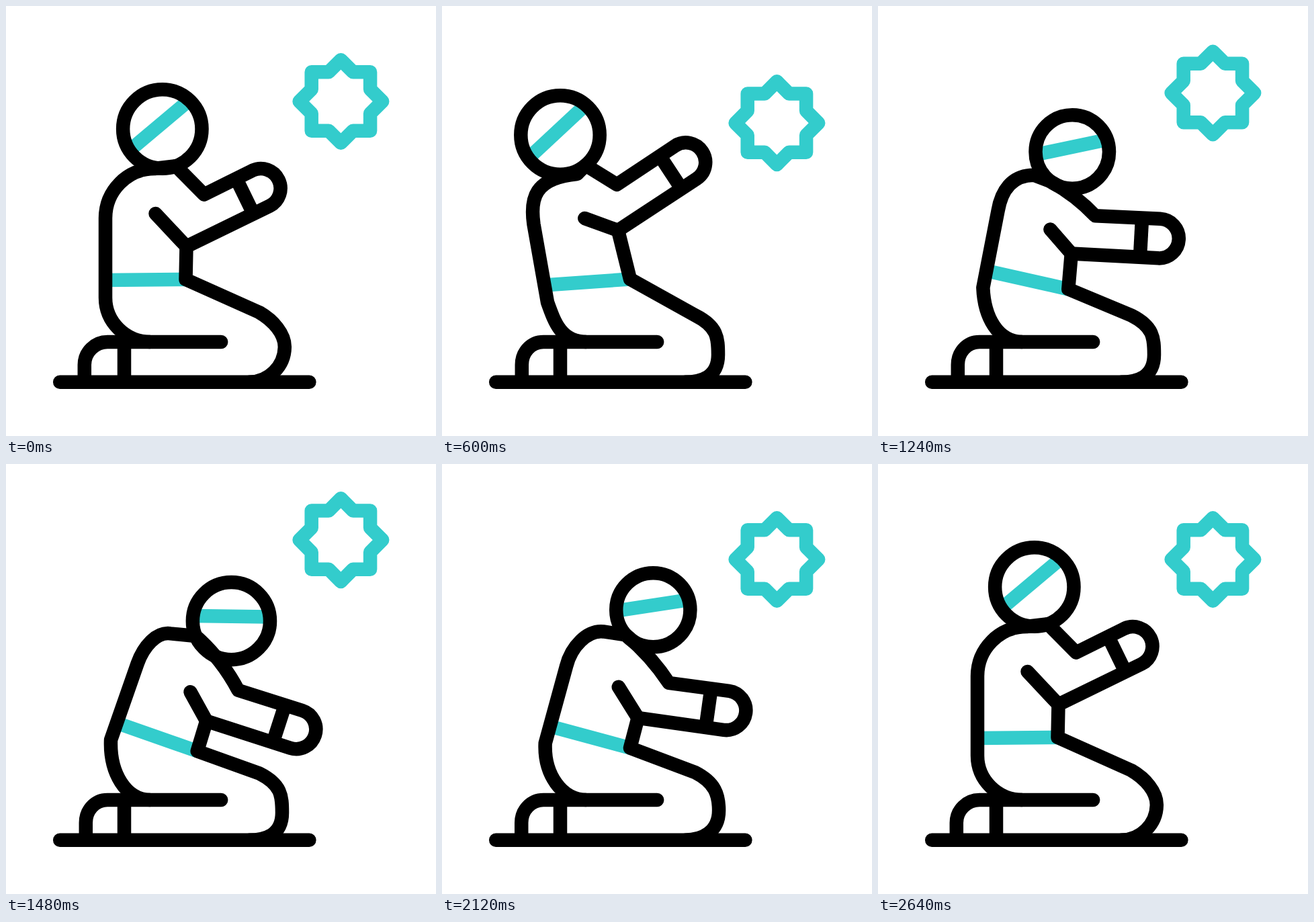
An HTML page that plays this animation: 640 by 640 pixels, repeating every 3 s.

```html
<!DOCTYPE html>
<html lang="en">
<head>
<meta charset="utf-8">
<title>Kneeling figure</title>
<style>
  html, body { margin: 0; width: 100%; height: 100%; overflow: hidden; background: #fff; }
  svg { display: block; width: 100%; height: 100%; }
  path, circle { fill: none; stroke: #000; stroke-width: 20.5; stroke-linejoin: round; }
  .teal { stroke: #33cccc; }
  .round { stroke-linecap: round; }
</style>
</head>
<body>
<svg viewBox="0 0 640 640">
  <path id="star" class="teal"/>
  <path id="belt" class="teal"/>
  <path id="stripe" class="teal"/>
  <circle id="head"/>
  <path id="cuff"/>
  <path id="torso" class="round"/>
  <path id="arm" class="round"/>
  <path id="leg" class="round"/>
  <path id="foot"/>
  <path class="round" d="M80.2 559.7H451.4"/>
</svg>
<script>
const LOOP = 3000;
const BACK = 600, FRONT = 1660, LEAVE = 1840, REST = 2620;
const HEAD_R = 58.7, HAND_R = 29.3;

// Three key poses. Angles in degrees; hipPull and the shoulder pulls are curve handles.
const rest = {
  head: [232.8, 183], tilt: -40, neck: 70, bend: 0,
  hip: [148, 434], hipPull: [148, 470],
  back: [148, 316], pullA: [148, 275], pullB: [181, 242], shoulder: [221, 242],
  upper: [222.5, 309], elbow: [268.5, 358], waist: [267.5, 407],
  arm: -26, reach: 138, crease: 57.6
};
const lean = {
  head: [176, 192], tilt: -43, neck: 50, bend: 0,
  hip: [157, 441], hipPull: [168, 472],
  back: [136.5, 325], pullA: [131, 287], pullB: [137, 256], shoulder: [201, 250],
  upper: [212.3, 316], elbow: [262, 334], waist: [280, 406.5],
  arm: -33.3, reach: 140, crease: 36
};
const bow = {
  head: [347.2, 238.5], tilt: 4, neck: 165, bend: 10,
  hip: [156, 408], hipPull: [153, 458],
  back: [200, 295], pullA: [210, 271], pullB: [230, 249], shoulder: [248, 252.5],
  upper: [279, 341], elbow: [301, 386], waist: [285, 429],
  arm: 21.7, reach: 132, crease: 30.5
};

const set = (id, attrs) => {
  for (const k in attrs) document.getElementById(id).setAttribute(k, attrs[k]);
};
const ease = (t, from, to) => {
  const p = Math.min(1, Math.max(0, (t - from) / (to - from)));
  return (1 - Math.cos(Math.PI * p)) / 2;
};
const mix = (a, b, p) =>
  Array.isArray(a) ? a.map((v, i) => mix(v, b[i], p)) : a + (b - a) * p;

function blend(a, b, p) {
  const out = {};
  for (const k in a) out[k] = mix(a[k], b[k], p);
  return out;
}

// Wide swings pull the head along an arc and draw head and arm in a little.
function poseAt(t) {
  if (t < BACK) return { ...blend(rest, lean, ease(t, 0, BACK)), size: HEAD_R };
  const rising = t > LEAVE;
  const p = rising ? ease(t, LEAVE, REST) : ease(t, BACK, FRONT);
  const pose = rising ? blend(bow, rest, p) : blend(lean, bow, p);
  const swing = 4 * p * (1 - p);
  pose.head[1] -= 6.5 * swing;
  pose.reach *= 1 - 0.045 * swing;
  pose.size = HEAD_R * (1 - 0.075 * swing);
  return pose;
}

// Point at (x, y) in a frame turned by deg around o.
function local(o, deg, x, y) {
  const a = deg * Math.PI / 180, c = Math.cos(a), s = Math.sin(a);
  return [o[0] + x * c - y * s, o[1] + x * s + y * c];
}

const at = p => p[0].toFixed(2) + " " + p[1].toFixed(2);
const path = (...pts) => "M" + pts.map(at).join("L");
const line = p => "L" + at(p);
const curve = (...pts) => (pts.length > 2 ? "C" : "Q") + pts.map(at).join(" ");

function drawStar(t) {
  const down = 37.6, up = -29;
  const shift = t < 800 ? mix(0, down, ease(t, 0, 800))
    : t < 1460 ? mix(down, up, ease(t, 800, 1460))
    : mix(up, 0, ease(t, 1460, 2040));
  const center = [498.4, 142 + shift];
  const pts = [];
  for (let i = 0; i < 16; i++) pts.push(local(center, i * 22.5, 0, i % 2 ? -47.3 : -61.8));
  set("star", { d: path(...pts) + "Z" });
}

function drawHead({ head, size, tilt }) {
  set("head", { cx: head[0], cy: head[1], r: size });
  set("stripe", { d: path(local(head, tilt, 2 - size, -7), local(head, tilt, size - 2, -7)) });
}

function drawBody(p) {
  const seat = [215, 500];
  const neck = local(p.head, p.neck, p.size, 0);
  const arm = (x, y) => local(p.elbow, p.arm, x, y);
  const width = 2 * HAND_R;
  const crease = arm(p.crease, -58);
  const slope = Math.atan2(crease[1] - neck[1], crease[0] - neck[0]) * 180 / Math.PI;
  const bend = local(mix(neck, crease, 0.5), slope, 0, -p.bend);

  set("torso", {
    d: path([320.2, 500], seat) + curve([178, 500], p.hipPull, p.hip) +
      line(p.back) + curve(p.pullA, p.pullB, p.shoulder) +
      line(neck) + curve(bend, crease) + line(arm(p.reach, -width)) +
      `A${HAND_R} ${HAND_R} 0 0 1 ` + at(arm(p.reach, 0)) + line(p.elbow)
  });
  set("arm", { d: path(p.upper, p.elbow) });
  set("cuff", { d: path(arm(p.reach - 27, -width + 4), arm(p.reach - 27, -4)) });
  set("belt", { d: path(mix(p.hip, p.back, 0.22), p.waist) });
}

// Knee and foot shift once the figure leaves its rest pose.
function drawLegs(p, k) {
  const thigh = [377, mix(456, 460.5, k)];
  const kx = mix(414.8, 411, k);
  const knee = [kx, mix(507, 519, k)];
  set("leg", {
    d: path(p.elbow, p.waist, thigh) +
      curve(mix([398, 468], [410, 477], k), [kx, mix(488, 494, k)], knee) +
      curve([kx, mix(536, 553, k)], [mix(391, 385, k), 559.7], [362, 559.7])
  });
  const fx = mix(116.8, 118.8, k);
  set("foot", {
    d: path([fx, 560], [fx, 534]) + curve([fx, 515.3], [132.3, 500], [151, 500]) +
      "H215M176 500V560"
  });
}

function draw(t) {
  const pose = poseAt(t);
  drawStar(t);
  drawHead(pose);
  drawBody(pose);
  drawLegs(pose, ease(t, 0, BACK) - ease(t, LEAVE, REST));
}

const start = performance.now();
function tick(now) {
  draw(Math.max(0, now - start) % LOOP);
  requestAnimationFrame(tick);
}
draw(0);
requestAnimationFrame(tick);
</script>
</body>
</html>
```
